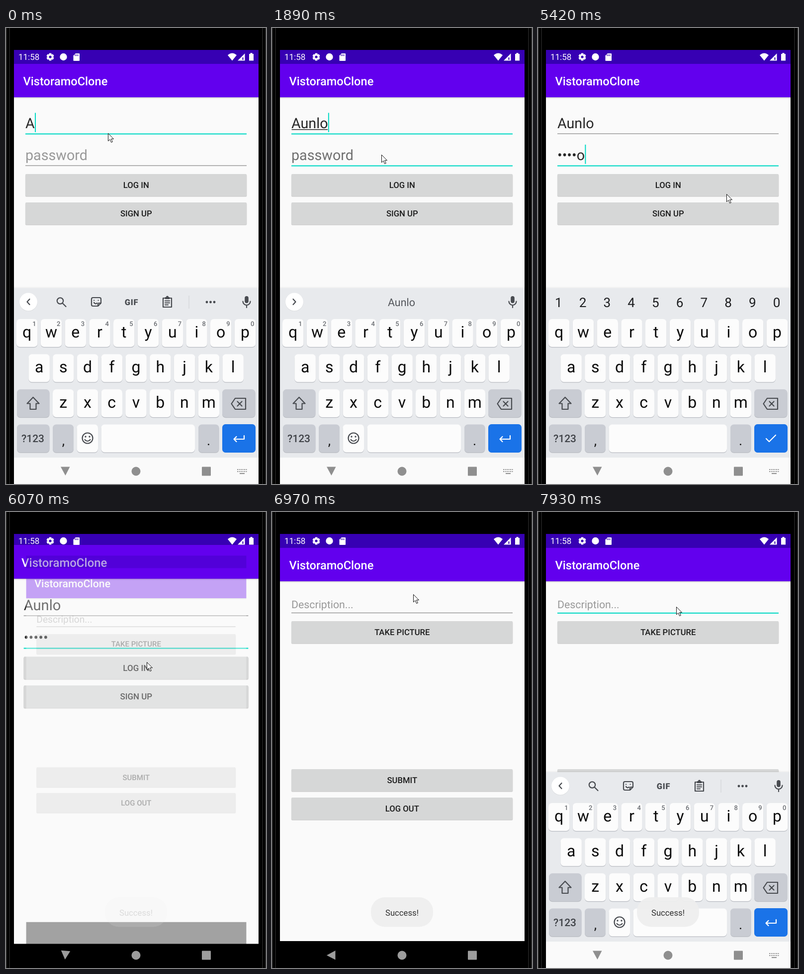
Write an HTML page that moves like this. It is 523 by 915 pixels and loops after 8000 ms.

```html
<!DOCTYPE html>
<html lang="en">
<head>
<meta charset="utf-8">
<title>Sign-in demo</title>
<style>
  html, body { margin: 0; width: 100%; height: 100%; overflow: hidden; background: #000; }
  svg { display: block; width: 100%; height: 100%; font-family: Roboto, sans-serif; text-rendering: geometricPrecision; }
  .mid { text-anchor: middle; }
  .input { font-size: 28.7px; fill: #262626; }
  .button { font-size: 16.7px; font-weight: 500; fill: #1c1c1c; }
  .letter { font-size: 32px; fill: #0c0c0c; }
  .digit { font-size: 26.2px; fill: #1d1e20; }
  .corner { font-size: 13px; font-weight: 500; fill: #6a6d72; }
  .word { font-size: 21.5px; fill: #55585d; }
  .line { fill: none; stroke: #484b50; stroke-width: 2.2; stroke-linejoin: round; stroke-linecap: round; }
  .ink { fill: #484b50; }
</style>
</head>
<body>
<svg id="stage" viewBox="0 0 523 915" xmlns="http://www.w3.org/2000/svg"></svg>
<script>
const LOOP = 8000;
const TEAL = '#03dac5', GREY = '#8e8e8e';
const APP = 'VistoramoClone';

// Step tables: [start in ms, ...values]; each row holds until the next.
const pointerSteps = [
  [0, 205, 211], [1200, 165, 180], [1320, 132, 157], [1470, 178, 226], [1620, 196, 251],
  [1740, 221, 269], [1890, 220, 254], [2010, 210, 249], [4730, 231, 229], [4880, 461, 561],
  [5030, 444, 497], [5180, 430, 450], [5300, 405, 385], [5420, 379, 333], [5570, 383, 333],
  [5690, 330, 312], [5830, 283, 301], [6460, 268, 280], [6580, 250, 256], [6730, 258, 225],
  [6850, 272, 190], [6970, 284, 165], [7120, 283, 181], [7270, 283, 185], [7420, 278, 190]
];
const nameSteps = [[0, 'A'], [150, 'Au'], [540, 'Aun'], [690, 'Aunl'], [930, 'Aunlo']];
const passSteps = [[0, ''], [2910, 'A'], [3310, '•u'], [3430, '••n'], [4080, '•••l'], [4200, '••••o'], [5690, '•••••']];
const caretSteps = [
  [0, 'name'], [1470, ''], [1890, 'name'], [2010, 'pass'], [2510, ''], [2910, 'pass'], [3930, ''],
  [4080, 'pass'], [4730, ''], [5180, 'pass'], [6070, ''], [7420, 'desc'], [7930, '']
];
const stripSteps = [[0, 'tools'], [270, 'words'], [2010, 'digits'], [7420, 'tools']];
const wordSteps = [
  [0, 'Aunt', 'Au', 'August'], [540, 'Aunt', 'Aun', 'Auntie'], [690, 'Aunt', 'Aunl', 'Auntie'], [930, '', 'Aunlo', '']
];
const slideSteps = [[0, 0], [6070, 400], [7540, 220], [7660, 60], [7810, 10], [7930, 0]];
const backSteps = [[0, -90], [6070, -85], [6190, -65], [6310, -25], [6460, 0], [7540, -30], [7660, -65], [7810, -90]];
const toastSteps = [[0, 0], [6070, .15], [6190, .5], [6310, .85], [6460, 1]];
// Login scale, home scale, home opacity.
const screenSteps = [
  [0, 1, .85, 0], [6070, 1.015, .9, .35], [6190, 1.0388, .966, .97], [6310, 1.047, .99, 1], [6460, 1.05, .998, 1], [6580, 1.05, 1, 1]
];

const at = (steps, t) => steps.findLast(row => row[0] <= t).slice(1);

const rect = (x, y, w, h, fill, extra = '') =>
  `<rect x="${x}" y="${y}" width="${w}" height="${h}" fill="${fill}" ${extra}/>`;
const text = (x, y, cls, value, extra = '') => `<text x="${x}" y="${y}" class="${cls}" ${extra}>${value}</text>`;
const path = (d, cls = 'line', extra = '') => `<path d="${d}" class="${cls}" ${extra}/>`;
const group = (id, body, extra = '') => `<g id="${id}" ${extra}>${body}</g>`;

const button = (y, label, id = '') =>
  rect(38.5, y + 1, 446.5, 45, '#000', 'rx="3" opacity=".07"') +
  rect(39, y + 1, 445, 44.5, '#000', 'rx="2" opacity=".1"') +
  rect(39, y, 445, 44, '#d6d7d7', `rx="2" ${id && `id="${id}"`}`) +
  text(261.8, y + 28, 'button mid', label);

const underline = (id, y) => rect(39, y, 445, 1.3, GREY, `id="${id}"`);

const appWindow = body =>
  rect(16, 44, 492, 28, '#3700b3') +
  rect(16, 72, 492, 67, '#6200ee') +
  rect(16, 139, 492, 722, '#fafafa') +
  rect(16, 139, 492, 3, 'url(#drop)') +
  rect(16, 861, 492, 54, '#000') +
  text(34.5, 115, '', APP, 'font-size="23.6" font-weight="500" fill="#fff"') + body;

const login = appWindow(
  text(39, 201, 'input', '', 'id="name"') +
  rect(39.5, 203, 0, 1.5, '#262626', 'id="composing"') +
  underline('nameLine', 211.5) +
  text(39, 265, 'input', 'password', 'id="hint"') +
  text(39, 265, 'input', '', 'id="pass"') +
  underline('passLine', 275.5) +
  button(293, 'LOG IN', 'loginButton') + button(350, 'SIGN UP'));

const home = appWindow(
  text(39, 193, '', 'Description...', 'font-size="21.3" fill="#999"') +
  underline('descLine', 201.8) +
  button(219, 'TAKE PICTURE') + button(516, 'SUBMIT') + button(573, 'LOG OUT'));

const key = (x, y, w, fill = '#fcfcfc') =>
  rect(x, y + 1.3, w, 56, '#b9bcc2', 'rx="7"') + rect(x, y, w, 56, fill, 'rx="7"');
const PITCH = 48.75, DARK = '#c9ccd3';
const letters = (chars, x, y) => [...chars].map((c, i) =>
  key(x + i * PITCH, y, 42.5) + text(x + 21.2 + i * PITCH, y + 36.8, 'letter mid', c)).join('');
const numbers = (x, y, cls) => [...'1234567890'].map((c, i) => text(x + i * PITCH, y, cls, c)).join('');

const mic = rect(480.2, 538, 7.6, 14, '#484b50', 'rx="3.8"') + path('M476.5 548.5a7.5 7.5 0 0 0 15 0M484 557v4');
const chevron = dir =>
  '<circle cx="45" cy="550" r="18.3" fill="#d5d7da"/><circle cx="45" cy="549.5" r="18" fill="#fff"/>' +
  path(`M${45 - 2.5 * dir} 544l${5 * dir} 5.5l${-5 * dir} 5.5`);

const tools = chevron(-1) +
  '<circle cx="109" cy="547.5" r="6.2" class="line"/>' + path('M114 552.5l6.5 6.5') +
  path('M175 541h13q3 0 3 3v8l-6 6h-10q-3 0-3-3v-11q0-3 3-3ZM191 552h-4q-2 0-2 2v4M177 551q3 4 6 1') +
  path('M177 546.5h.2M185.5 546.5h.2') +
  text(252.5, 555.5, 'ink mid', 'GIF', 'font-size="16.5" font-weight="900" letter-spacing=".8"') +
  path('M316 542h17v18h-17ZM320 547.5h9M320 551.5h9M320 555.5h6') +
  path('M320 540h9v4h-9Z', 'ink') + '<circle cx="324.5" cy="540" r="2.5" class="ink"/>' +
  rect(367.5, 537, 1, 26, '#cdd0d4') +
  [404, 411.5, 419].map(x => `<circle cx="${x}" cy="550" r="2.4" class="ink"/>`).join('') + mic;

const words = chevron(1) + [130, 260.5, 390].map((x, i) => text(x, 557.5, 'word mid', '', `id="word${i}"`)).join('') +
  group('dividers', rect(195, 538, 1, 24, '#cdd0d4') + rect(325, 538, 1, 24, '#cdd0d4')) + mic;

const smiley = '<circle cx="164" cy="823" r="10.5" class="line"/>' + path('M158.5 826q5.5 6 11 0') +
  '<circle cx="160" cy="820" r="1.7" class="ink"/><circle cx="168" cy="820" r="1.7" class="ink"/>';

const keyboard =
  rect(16, 519.5, 492, 3, '#000', 'opacity=".035"') + rect(16, 522, 492, 393, '#e8eaed') +
  group('tools', tools) + group('words', words) + group('digits', numbers(41.3, 560, 'digit mid')) +
  letters('qwertyuiop', 21, 584) + group('corners', numbers(57, 598, 'corner mid')) +
  letters('asdfghjkl', 45.4, 654.5) + letters('zxcvbnm', 94, 725) +
  key(22, 725, 65.5, DARK) + path('M54.5 741l12 12.5h-6v11.5h-12v-11.5h-6Z') +
  key(435, 725, 66.5, DARK) + path('M461 743h21v22h-21l-7.5-11ZM465.5 749.5l9 9M474.5 749.5l-9 9') +
  key(22, 795.5, 65.5, DARK) + text(54, 831, 'mid', '?123', 'font-size="21" font-weight="500" fill="#3f4247"') +
  key(94, 795.5, 42, DARK) + text(115.5, 837, 'mid', ',', 'font-size="27" fill="#161616"') +
  group('openRow', key(142.5, 795.5, 42.5) + smiley + key(191.5, 795.5, 188.5)) +
  group('secretRow', key(142.5, 795.5, 237.5)) +
  key(387, 795.5, 41.5, DARK) + text(407.5, 837, 'mid', '.', 'font-size="27" fill="#161616"') +
  rect(435, 795, 67, 57, '#1a73e8', 'rx="6.5"') +
  path('M479 818v7h-20M463.5 820l-5 5l5 5', 'line', 'id="enter" style="stroke:#fff"') +
  path('M459 824l6 6l13-13', 'line', 'id="check" style="stroke:#fff"');

const keyDots = [885, 889].map(y => [0, 1, 2, 3, 4, 5].map(i => rect(465 + i * 3.5, y, 2, 2, '#8f8f8f')).join('')).join('');
const nav = rect(16, 862, 492, 53, '#fafafa', 'id="navBack"') +
  group('navIcons',
    path('M110 889.5L127.5 880V898.5Z', '', 'id="back"') +
    '<circle cx="261.5" cy="889.5" r="9"/><rect x="394" y="880.5" width="18" height="18" rx="1"/>') +
  group('switcher', keyDots + rect(470, 893, 10, 2, '#8f8f8f'));

const gearTeeth = [0, 60, 120].map(a => rect(86.5, 50.5, 5, 15, '#fff', `rx="1" transform="rotate(${a} 89 58)"`)).join('');
const status = text(25, 64.2, '', '11:58', 'font-size="17" fill="#fff"') + gearTeeth +
  '<circle cx="89" cy="58" r="5.8" fill="#fff"/><circle cx="89" cy="58" r="2.6" fill="#3700b3"/>' +
  '<circle cx="115.5" cy="58" r="7.2" fill="#fff"/>' +
  '<g fill="#fff"><path d="M140 51h7q1 0 1 1v13q0 1-1 1h-10.5q-1 0-1-1v-9.5Z"/>' +
  '<path d="M446 54.5q9-8 18 0L455 65.5Z"/><path d="M480.5 51v14.5h-14.5Z"/>' +
  '<path d="M489 52h2.5v-2h4v2h2.5v13.5h-9Z"/></g>' +
  path('M475.5 59h2v5h-2Z', '', 'fill="#3700b3"') +
  [138.5, 141.2, 144].map(x => rect(x, 53, 1.3, 3.2, '#3700b3')).join('');

const toast = rect(199, 773, 125, 59.5, '#efefef', 'rx="28" opacity=".95"') +
  text(261.5, 809.5, 'mid', 'Success!', 'font-size="16.7" fill="#303030"');

const bezel = [[0, 2, '#262626'], [6, 2, '#1c1c1c'], [515, 2, '#1c1c1c'], [521, 2, '#262626']]
  .map(([x, w, fill]) => rect(x, 0, w, 915, fill)).join('');

const stage = document.getElementById('stage');
stage.innerHTML = `<defs>
    <clipPath id="glass"><rect x="16" y="44" width="492" height="871"/></clipPath>
    <linearGradient id="drop" x2="0" y2="1"><stop stop-color="#000" stop-opacity=".2"/><stop offset="1" stop-color="#000" stop-opacity="0"/></linearGradient>
  </defs>` + rect(0, 0, 523, 915, '#000') + bezel +
  `<g clip-path="url(#glass)">` + group('login', login) + group('home', home) +
  rect(0, 0, 2, 38, TEAL, 'id="caret"') +
  group('keyboard', keyboard) + nav + group('toast', toast) + status + '</g>' +
  path('M.5.5V16L4 12.5L6.7 18.5L9.3 17.4L6.6 11.7H11.5Z', '', 'id="pointer" fill="#fff" stroke="#111" stroke-width="1"');

const ui = {};
for (const el of stage.querySelectorAll('[id]')) ui[el.id] = el;

const set = (id, attr, value) => ui[id].setAttribute(attr, value);
const show = (id, on) => set(id, 'display', on ? 'inline' : 'none');
const scaled = s => `translate(262 479.5) scale(${s}) translate(-262 -479.5)`;
const focusLine = (id, on) => {
  set(id, 'fill', on ? TEAL : GREY);
  set(id, 'height', on ? 2.1 : 1.3);
};

function drawCaret(field) {
  show('caret', field);
  if (!field) return;
  const [y, h] = { name: [170.3, 38.7], pass: [234, 38.7], desc: [171, 29] }[field];
  const width = field === 'desc' ? 0 : ui[field].getComputedTextLength();
  set('caret', 'x', 39.3 + width);
  set('caret', 'y', y);
  set('caret', 'height', h);
}

function draw(t) {
  const [px, py] = at(pointerSteps, t);
  set('pointer', 'transform', `translate(${px} ${py})`);

  const [loginScale, homeScale, homeAlpha] = at(screenSteps, t);
  set('login', 'transform', scaled(loginScale));
  set('home', 'transform', scaled(homeScale));
  set('home', 'opacity', homeAlpha);
  show('login', t < 6580);
  show('home', homeAlpha);

  const [secret] = at(passSteps, t);
  [ui.name.textContent] = at(nameSteps, t);
  ui.pass.textContent = secret;
  show('hint', !secret);
  ui.hint.style.fill = t >= 1890 && t < 2010 ? '#707070' : '#999';
  set('composing', 'width', t >= 150 && t < 2010 ? ui.name.getComputedTextLength() - 1 : 0);
  focusLine('nameLine', t < 2010);
  focusLine('passLine', t >= 1890);
  focusLine('descLine', t >= 7420);
  set('loginButton', 'fill', t >= 5830 && t < 6070 ? '#c6c7c7' : '#d6d7d7');
  drawCaret(at(caretSteps, t)[0]);

  const [strip] = at(stripSteps, t);
  for (const id of ['tools', 'words', 'digits']) show(id, id === strip);
  const isSecret = strip === 'digits';
  for (const id of ['corners', 'openRow', 'enter']) show(id, !isSecret);
  for (const id of ['secretRow', 'check']) show(id, isSecret);
  const suggestions = at(wordSteps, t);
  suggestions.forEach((word, i) => { ui['word' + i].textContent = word; });
  show('dividers', strip === 'words' && suggestions[0]);

  const [slide] = at(slideSteps, t);
  const open = slide < 400;
  set('keyboard', 'transform', `translate(0 ${slide})`);
  for (const id of ['keyboard', 'navBack', 'switcher']) show(id, open);
  set('navIcons', 'fill', open ? '#8f8f8f' : '#9c9c9c');
  set('back', 'transform', `rotate(${at(backSteps, t)[0]} 119 889)`);
  set('toast', 'opacity', at(toastSteps, t)[0]);
}

const start = performance.now();
function tick() {
  draw((performance.now() - start) % LOOP);
  requestAnimationFrame(tick);
}
tick();
</script>
</body>
</html>
```
